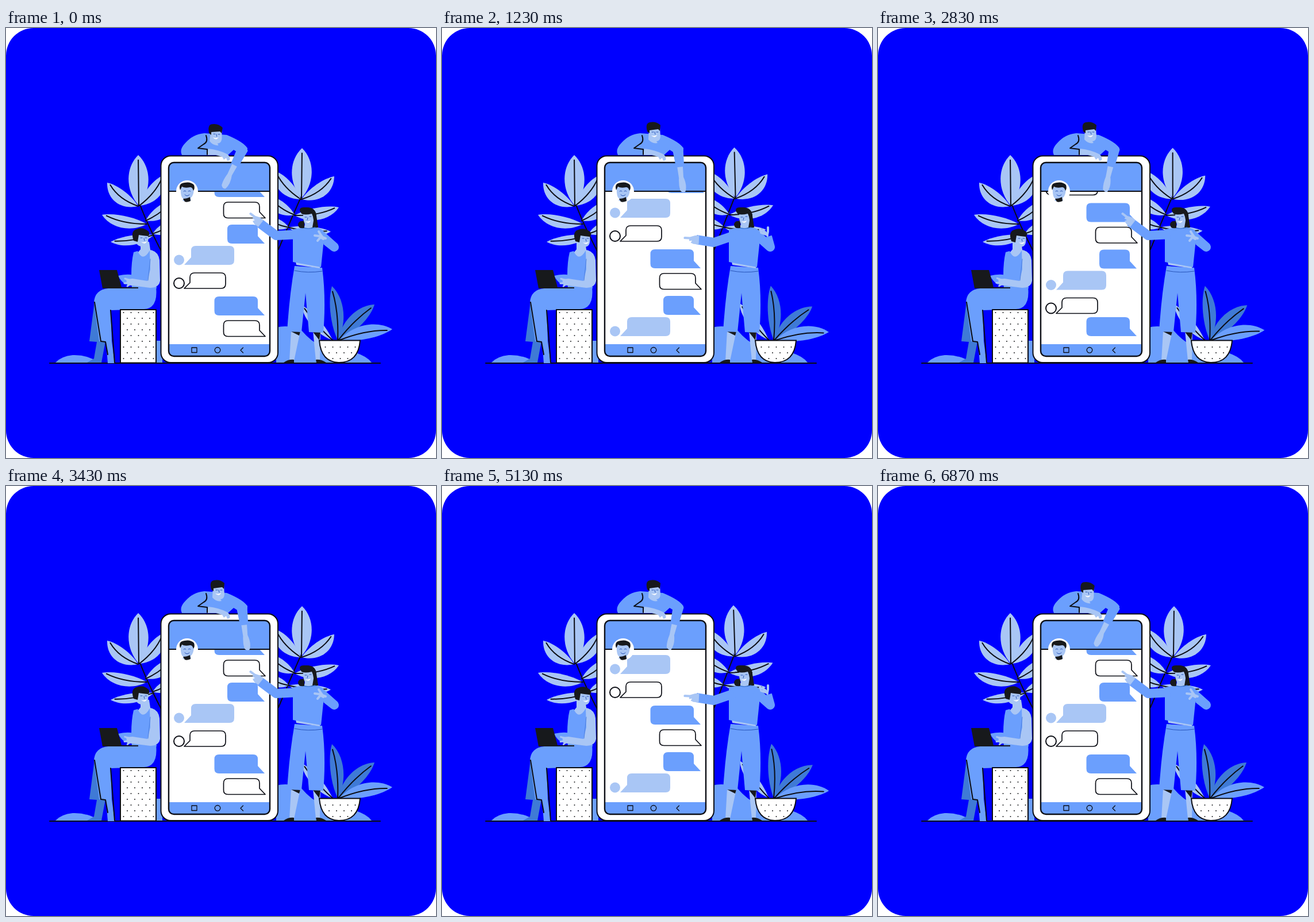
An HTML page for the animation above (6930 ms loop, 748 by 748 pixels).

```html
<!DOCTYPE html>
<html lang="en">
<head>
<meta charset="utf-8">
<title>Chat scene</title>
<style>
  html, body { margin: 0; width: 100%; height: 100%; overflow: hidden; background: #fff; }
  svg { display: block; width: 100%; height: 100%; }
  .mid { fill: #6b9ffd; }
  .light { fill: #a9c6f5; }
  .dark { fill: #3f7ad6; }
  .ink { fill: #17191c; }
  .white { fill: #fff; }
  .line { fill: none; stroke: #0b0d14; stroke-width: 2; stroke-linejoin: round; stroke-linecap: round; }
  .edge { stroke: #0b0d14; stroke-width: 2; }
  .thin { stroke-width: 1.3; }
  .sleeve { fill: none; stroke: #6b9ffd; stroke-width: 16; stroke-linejoin: round; }
  .skin { fill: none; stroke: #a9c6f5; stroke-linecap: round; stroke-linejoin: round; }
  .face { fill: none; stroke: #2855b8; stroke-width: 1; stroke-linecap: round; }
</style>
</head>
<body>
<svg viewBox="0 0 748 748">
  <defs>
    <pattern id="dots" width="13" height="20" patternUnits="userSpaceOnUse">
      <circle cx="3" cy="5" r="1" class="ink"/><circle cx="9.5" cy="15" r="1" class="ink"/>
    </pattern>
    <clipPath id="feed"><rect x="284" y="285" width="174" height="265"/></clipPath>
    <clipPath id="screen"><rect x="283" y="234" width="176" height="337" rx="9"/></clipPath>
  </defs>
  <rect width="748" height="748" rx="48" fill="#00f"/>

  <g id="leftPlant"></g>
  <g id="rightPlant"></g>
  <path class="mid" d="M86 582 Q96 571 116 569 Q142 568 162 582Z M261 544H272V583H261Z
    M470 521 Q492 515 514 526 Q530 545 552 556 Q620 560 636 582 H470Z"/>
  <g id="potLeaves"></g>
  <path class="line" d="M76 583H651"/>

  <g id="phone">
    <rect class="white edge" x="269.500" y="222.500" width="203.500" height="359.500" rx="17"/>
    <rect class="white" x="283" y="234" width="176" height="337" rx="9"/>
    <g clip-path="url(#feed)"><g id="messages"></g></g>
    <path class="mid" clip-path="url(#screen)" d="M283 234H459V284H283Z M283 550H459V571H283Z"/>
    <path class="line" d="M283 284H459"/>
    <rect class="line" x="283" y="234" width="176" height="337" rx="9" style="stroke-width:2.400"/>
    <path class="line thin" d="M323 556H332V564.500H323Z M412.500 556L408 560.500L412.500 565"/>
    <circle class="line thin" cx="368" cy="560.300" r="4.800"/>
    <circle class="white" cx="315" cy="284" r="19"/>
    <path class="light" d="M304 277 Q303 295 309 297 L307 300 Q314 304 322 300 L321 296 Q327 292 327 277Z"/>
    <path class="ink" d="M303 282 Q299 270 311 269 Q321 267 327 273 Q329 279 326 283 Q324 276 320 277 Q311 279 306 276Z M308 297 Q315 297 320 294 L321 301 Q314 304 311 302Z"/>
    <path class="face" d="M309 284q2-2 4 0 M317 284q2-2 4 0 M311 290q4 4 8 0"/>
  </g>

  <g id="topMan">
    <path class="mid" d="M306 221 Q301 211 312 200 Q325 185 345 183 L384 186 Q413 198 420 209 Q421 217 410 220 Q402 216 396 212 L386 221Z"/>
    <path class="light" d="M350 221 L352 210 Q370 212 384 219 Q391 223 389 230 L385 231 L383 226 L379 229 L376 224 L365 221Z"/>
    <path class="line" d="M348 187 Q352 198 344 202 L334 209 L350 211 L350 220"/>
    <g id="forearm">
      <path class="light" d="M-5 26 L5 26 L4 47 Q9 61 5 72 Q1 76 -4 70 Q-6 60 -4 48Z"/>
      <path class="mid" d="M-10 -4 Q0 -9 9 -4 L7 29 L-7 29Z"/>
    </g>
    <g id="topHead">
      <path class="light" d="M360 173 L379 173 L380 189 Q379 197 373 197 L375 200 Q366 202 359 194Z"/>
      <path class="ink" d="M357 180 Q353 165 362 164 Q372 162 380 169 L379 179 L376 176 L361 178 L361 183Z"/>
      <path class="face" d="M365 181h3 M373 181h3 M370 181l1 4"/>
      <path class="white" d="M364 187 Q370 189 374 186 Q371 193 364 187Z"/>
    </g>
  </g>

  <g id="sitter">
    <path class="dark" d="M154 476 L145 545 L158 546 L153 575 L141 582 H166 L173 545Z"/>
    <path class="mid" d="M153 478 Q154 455 178 453 L261 450 Q265 488 240 489 L182 491 L184 545 L189 583 H177 L174 546 L162 545Z"/>
    <path class="line" d="M154 477 L165 545 L173 546 L177 568 M182 491 L189 582"/>
    <path class="mid" d="M195 431 Q212 427 221 430 L222 447 L208 446 Q199 440 195 431Z"/>
    <path class="light" d="M234 370 L249 372 L252 392 Q240 407 229 391 L234 385Z"/>
    <path class="mid" d="M222 390 L229 388 Q238 408 250 387 L258 402 L262 453 L219 455 Q216 415 222 390Z"/>
    <path class="light" d="M250 386 Q265 388 267 404 L268 440 Q266 452 251 452 L211 447 L209 437 L220 436 L246 440 L251 420Z"/>
    <path class="line" style="stroke:#4c7fe0;stroke-width:1" d="M251 402 L247 439"/>
    <g id="typing"><path class="skin" stroke-width="3" d="M220 440 L207 436 M219 442 L206 444 M218 444 L211 449"/></g>
    <path class="ink" d="M162 421 H193 L201 451 H230 V453 H168Z"/>
    <g id="sitHead">
      <path class="light" d="M237 360 L257 361 Q259 378 252 380 Q243 384 236 375Z"/>
      <path class="ink" d="M232 371 Q226 354 237 351 Q248 346 258 355 Q261 360 257 363 Q247 362 241 361 L239 373Z"/>
      <path class="face" d="M244 366h3 M252 366h3 M250 367l1 4"/>
      <path class="white" d="M245 373 Q250 375 255 372 Q252 379 245 373Z"/>
    </g>
    <rect class="white edge" x="199" y="490" width="62" height="92.500"/>
    <rect x="200" y="491" width="60" height="91" fill="url(#dots)"/>
  </g>

  <g id="woman">
    <path class="light" d="M496 527 H512 L501 579 H493Z M534 527 H547 L546 579 H539Z"/>
    <path class="ink" d="M483 582 Q491 576 501 577 V582Z M539 577 Q548 576 557 582 H540Z M496 528 H512 L510 535Z M534 529 H547 L545 543Z"/>
    <path class="mid" d="M502 414 L550 417 Q557 470 552 530 L527 529 L521 461 L514 529 L489 528 Q493 465 502 414Z"/>
    <path class="face" d="M502 422 Q525 427 550 423"/>
    <path class="light" d="M503 402 H547 L546 418 L505 412Z"/>
    <path class="mid" d="M499 350 L520 347 H540 Q552 349 554 358 L548 416 L499 407Z"/>
    <path class="ink" d="M512 320 Q508 311 521 312 Q539 311 540 327 L543 347 L531 348 L519 339 L519 348 Q508 350 508 341 Q510 335 517 336 L519 326Z"/>
    <path class="light" d="M517 324 Q525 323 531 320 L536 329 L534 341 L533 347 Q525 350 519 347 L520 341 Q516 333 517 324Z"/>
    <path class="ink" d="M511 316 Q518 309 532 314 Q541 319 540 331 L543 347 L534 347 Q537 333 532 323 Q520 326 514 323Z"/>
    <path class="face" d="M520 329h3 M528 328h3 M525 330l-1 4"/>
    <path class="white" d="M520 336 Q525 338 530 335 Q527 342 520 336Z"/>
    <path class="line thin" style="stroke:#3f7ad6" d="M519 348 Q527 350 538 347"/>
    <path id="backArm" class="sleeve"/>
    <path id="backHand" class="skin" stroke-width="4"/>
    <path id="pointArm" class="sleeve"/>
    <g id="pointHand"><path class="light" d="M-1 -7 L6 -7 L6 8 L-3 8 L-8 6 L-6 2 L-11 3 L-11 0 L-20 0 Q-22 -3 -19 -4 L-10 -4Z"/></g>
  </g>

  <path class="white edge" d="M545 543.500 H616 Q613 582 579 582 Q548 581 545 543.500Z"/>
  <path fill="url(#dots)" d="M548 546 H613 Q610 579 579 579 Q551 578 548 546Z"/>
</svg>
<script>
const NS = "http://www.w3.org/2000/svg";
const $ = id => document.getElementById(id);
const LOOP = 6930, CHAT = LOOP / 2, LEAN = LOOP / 3;

function add(parent, tag, attrs) {
  const el = document.createElementNS(NS, tag);
  for (const key in attrs) el.setAttribute(key, attrs[key]);
  return parent.appendChild(el);
}

// A pointed leaf from (x, y) to (tx, ty); bend bows it sideways.
function leaf(parent, cls, x, y, tx, ty, width, bend = 0) {
  const len = Math.hypot(tx - x, ty - y);
  const turn = Math.atan2(ty - y, tx - x) * 180 / Math.PI;
  const g = add(parent, "g", { transform: `translate(${x} ${y}) rotate(${turn})` });
  const side = w => `${len * .3} ${w + bend} ${len * .75} ${w + bend}`;
  add(g, "path", {
    class: cls,
    d: `M0 0 C${side(-width)} ${len} 0 C${len * .75} ${width + bend} ${len * .3} ${width + bend} 0 0Z`
  });
  add(g, "path", { class: "line", d: `M0 0 Q${len * .5} ${bend * 1.4} ${len * .9} 0` });
}

const left = $("leftPlant"), right = $("rightPlant"), pot = $("potLeaves");
add(left, "path", { class: "line", d: "M231 302 Q245 340 270 388" });
leaf(left, "light", 231, 309, 230, 221, 23);
leaf(left, "light", 230, 310, 176, 269, 16, -8);
leaf(left, "light", 245, 341, 167, 325, 14, -6);
leaf(left, "light", 257, 360, 182, 372, 11, -4);
leaf(left, "light", 232, 309, 276, 255, 16, 6);
leaf(left, "light", 243, 335, 290, 300, 14, 5);
leaf(left, "light", 255, 358, 296, 334, 12, 4);
add(right, "path", { class: "line", d: "M514 292 Q494 337 474 385" });
leaf(right, "light", 514, 296, 515, 209, 23);
leaf(right, "light", 514, 298, 571, 258, 16, 8);
leaf(right, "light", 502, 326, 579, 312, 14, 6);
leaf(right, "light", 492, 347, 565, 354, 11, 4);
leaf(right, "light", 513, 298, 466, 248, 16, -6);
leaf(right, "light", 502, 325, 455, 292, 14, -5);
leaf(right, "light", 492, 347, 450, 328, 12, -4);
leaf(pot, "light", 568, 543, 514, 482, 11, -3);
leaf(pot, "dark", 577, 543, 567, 449, 15, 5);
leaf(pot, "dark", 578, 543, 641, 481, 16, -4);
leaf(pot, "mid", 580, 543, 672, 524, 16, -6);

// Message kinds in the order they repeat, each drawn from its top edge.
const solid = x => `M${x + 8} 0H430Q438 0 438 8V20L450 33H${x + 8}Q${x} 33 ${x} 25V8Q${x} 0 ${x + 8} 0Z`;
const kinds = [
  { gap: 42, h: 33, cls: "mid", d: solid(362.5) },
  { gap: 39, h: 27, cls: "line", d: "M386 0H433Q441 0 441 8V17L451 27.500H386Q378.500 27.500 378.500 20V8Q378.500 0 386 0Z" },
  { gap: 37, h: 33, cls: "mid", d: solid(385) },
  { gap: 47, h: 33, cls: "light", d: "M330 0H389Q397 0 397 8V25Q397 33 389 33H310L322 20V8Q322 0 330 0Z", dot: 24.5 },
  { gap: 41, h: 27, cls: "line", d: "M328 0H374Q382 0 382 8V19Q382 27 374 27H310L320 17V8Q320 0 328 0Z", dot: 18 }
];
const FLOOR = 536, LAST = 6;
const messages = [];
for (let k = 0, y = 0; k < 12; k++) {
  const kind = kinds[k % 5];
  const el = add($("messages"), "g", {});
  add(el, "path", { class: kind.cls, d: kind.d, style: "stroke-width:1.7" });
  if (kind.dot) add(el, "circle", { class: kind.cls, cx: 301, cy: kind.dot, r: 9 });
  messages.push({ el, y, rest: FLOOR - kind.h, h: kind.h, pivot: kind.dot ? 292 : 450, drifts: k % 5 === 2 });
  y += kind.gap;
}
const settled = k => messages[k].y - messages[k].rest;
// Start and length of each of the five pushes.
const pushes = [[20, 650], [640, 560], [1560, 640], [2293, 720], [2900, 480]];

const clamp = x => Math.max(0, Math.min(1, x));
const smooth = x => { x = clamp(x); return x * x * (3 - 2 * x); };
const mix = (a, b, p) => a + (b - a) * p;
// 1 between two times, with short ramps.
const hold = (t, from, to, ramp = 140) => smooth((t - from) / ramp) - smooth((t - to) / ramp);
const place = (id, value) => $(id).setAttribute("transform", value);
const path = (points, other, p) =>
  "M" + points.map((v, i) => mix(v, other[i], p).toFixed(2)).join(" ");

function drawChat(t) {
  const progress = pushes.map(([start, length]) => smooth((t - start) / length));
  const scroll = progress.reduce(
    (sum, p, i) => sum + p * (settled(LAST + i + 1) - settled(LAST + i)), settled(LAST));
  messages.forEach((m, k) => {
    const p = k > LAST ? progress[k - LAST - 1] : 1;
    const grow = clamp((p - .07) / .5);
    const y = Math.min(m.rest, m.y - scroll);
    const drift = m.drifts ? 6 * clamp((342 - y) / 37) : 0;
    const scale = .3 + .7 * grow;
    m.el.setAttribute("opacity", grow);
    m.el.setAttribute("transform",
      `translate(${m.pivot + drift} ${y - drift + m.h}) scale(${scale}) translate(${-m.pivot} ${-m.h})`);
  });
}

function draw(now) {
  const time = now % LOOP, t = time % CHAT, lean = time % LEAN;
  const sway = Math.cos(2 * Math.PI * t / CHAT);
  drawChat(t);
  place("rightPlant", `rotate(${1.28 * (sway - 1)} 475 390)`);
  place("potLeaves", `rotate(${1.85 * (1 - sway)} 577 543)`);

  place("forearm", `translate(411 213) rotate(${10.5 + 17 * Math.cos(2 * Math.PI * lean / LEAN)})`);
  const nod = 1 - hold(lean, 280, LEAN - 400);
  place("topHead", `translate(${-5 * nod} ${3.5 * nod}) rotate(${4 * nod} 368 195)`);

  const lookUp = hold(t, 800, 3050);
  place("sitHead", `translate(${-10 * (1 - lookUp)} ${-1 * (1 - lookUp)})`);
  place("typing", `rotate(${3 * Math.sin(2 * Math.PI * t / CHAT * 10)} 220 442)`);

  const lower = hold(t, 200, 1930);
  $("pointArm").setAttribute("d", path([508, 359, 470, 361, 438, 337], [508, 361, 473, 373, 442, 368], lower));
  place("pointHand", `translate(${mix(439, 441, lower)} ${mix(336, 368, lower)}) rotate(${mix(38, 3, lower)})`);
  $("backArm").setAttribute("d", path([544, 357, 571, 381, 557, 370], [544, 357, 571, 381, 566, 363], lower));
  $("backHand").setAttribute("d",
    path([556, 366, 545, 362, 537, 361], [566, 361, 562, 355, 553, 350], lower) +
    path([552, 367, 547, 364, 542, 370], [566, 359, 567, 354, 567, 347], lower) +
    path([550, 363, 547, 359, 544, 354], [564, 359, 560, 358, 555, 356], lower));
}

function tick(now) {
  draw(now);
  requestAnimationFrame(tick);
}
draw(0);
requestAnimationFrame(tick);
</script>
</body>
</html>
```
